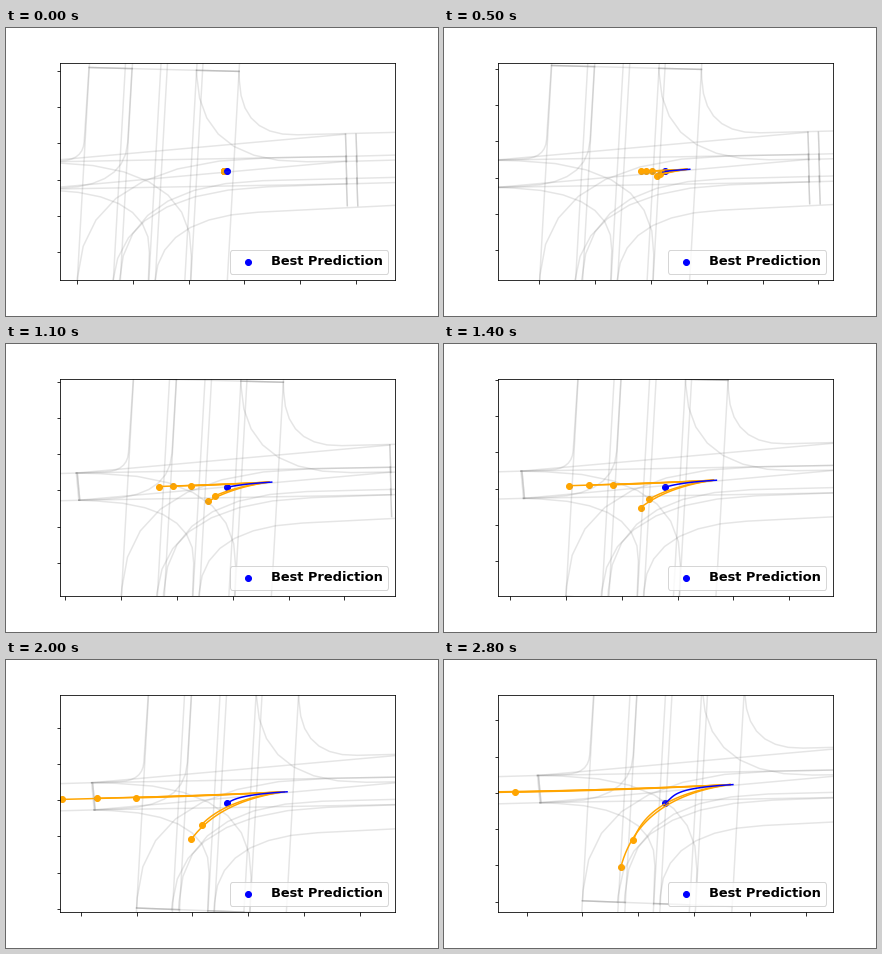
These frames come from a looping animation (432x288 px, 2900 ms). A matplotlib script:

```python
import numpy as np
import matplotlib.pyplot as plt
from matplotlib.animation import FuncAnimation

W, H, DPI = 432, 288, 72
FRAMES, INTERVAL = 29, 100
LEFT, RIGHT, TOP, BOTTOM = 54, 388.8, 34.56, 252
START = np.array([(LEFT + RIGHT) / 2, (TOP + BOTTOM) / 2])
MAP_SHIFT = np.array([0.5, -0.8])

fig = plt.figure(figsize=(W / DPI, H / DPI), dpi=DPI, facecolor="white")
ax = fig.add_axes([LEFT / W, 1 - BOTTOM / H, (RIGHT - LEFT) / W, (BOTTOM - TOP) / H])
ax.set_xticks(70.95 + (RIGHT - LEFT) / 6 * np.arange(-3, 8), labels=[])
ax.set_yticks(42.85 + (BOTTOM - TOP) / 6 * np.arange(-2, 9), labels=[])


def road(*points, times=1):
    xy = np.array(points) + MAP_SHIFT
    for _ in range(times):
        ax.plot(*xy.T, color="gray", alpha=0.2, lw=1.5)


def turn(start, corner, end, lead_in, lead_out):
    """Straight part of each leg, joined by a coarse arc round the corner."""
    start, corner, end = map(np.array, (start, corner, end))
    a = start + (corner - start) * lead_in
    b = end + (corner - end) * lead_out
    u = np.linspace(0, 1, 8)[:, None]
    arc = (1 - u) ** 2 * a + 2 * u * (1 - u) * corner + u ** 2 * b
    road(start, *arc, end)


# North-south lane borders, all leaning the same way
borders = [83, 119, 126, 154.5, 161, 190.5, 196.5, 233]


def on_border(i, y):
    return borders[i] - 0.056 * (y - 36), y


for i in range(len(borders)):
    road(on_border(i, 32), on_border(i, 276))


def stop_line(i, j, y, rise, times):
    road(*(on_border(k, y + rise * (borders[k] - borders[0])) for k in (i, j)), times=times)


for pairs, y, rise in [([(0, 2), (5, 7)], 40.3, 0.026), ([(0, 2), (3, 5)], 260.3, 0.038)]:
    stop_line(0, 7, y, rise, times=1)
    for i, j in pairs:
        stop_line(i, j, y, rise, times=2)

# Crossing lines on the west and east arms
west_top, west_low = (25.5, 135), (28, 162.2)
road(west_top, west_low)
road((26.5, 135), (29, 162.2), times=2)
for x in (339, 349.5):
    for k in range(3):
        road((x + 0.4 * k, 107 + 22 * k), (x + 0.4 * k + 1, 134.5 + 22 * k), times=2)

# East-west lane borders
for gate, straight, flat in [(west_top, 107, 129.2), (west_low, 134.2, 156.7)]:
    road((-20, gate[1] + 1.3), gate)
    road(gate, (339, straight))
    road(gate, (340, flat), (395, flat - 1.5))
road((340, 134.2), (395, 132.7))

# Turns through the crossing
turn((82.5, 40.3), (76.5, 133), west_top, 0.8, 0.55)
turn((125.5, 41), (118.7, 158.5), west_low, 0.63, 0.29)
turn((232.5, 44), (235, 109), (395, 105), 0.15, 0.65)
turn((190, 43), (193, 136), (340, 134), 0.05, 0.27)
turn(west_top, (188, 139), (183.7, 265), 0.15, 0.28)
turn(west_low, (145, 167), (141.5, 264), 0.15, 0.4)
turn((70.5, 260), (78, 134), (340, 129.2), 0.08, 0.3)
turn((105.5, 262), (114, 165), (340, 156.7), 0.07, 0.35)
turn((112.5, 262), (117, 157), (395, 150), 0.07, 0.5)
turn((147.8, 264), (152, 190), (395, 177.8), 0.12, 0.59)

t = np.arange(FRAMES)


def drive(vx, vy, ax_, ay_):
    """Constant acceleration from just behind the start."""
    return START + np.column_stack([-3 + t * (vx + ax_ * t), t * (vy + ay_ * t)])


# The slowing car passes these distances at even times
slowing = np.polyfit(np.linspace(0, 28, 5), [0, 32.1, 51, 60.7, 67.5], 4)
car = START + np.column_stack([-np.polyval(slowing, t), t * (0.34 + 0.0117 * t)])
agents = [
    drive(-8.55, 0.42, -0.128, -0.002),
    drive(-7.85, 0.42, -0.076, -0.005),
    drive(-6.7, 0.39, -0.0345, -0.0043),
    drive(-5.8, 0.75, 0.084, 0.0445),
    drive(-6.5, 0.95, 0.093, 0.0715),
]
paths = agents + [car]
colors = ["orange"] * len(agents) + ["blue"]
trails = [ax.plot([], [], color=c, lw=1.5)[0] for c in colors]
dots = [ax.scatter([], [], color=c) for c in colors]
dots[-1].set_label("Best Prediction")
ax.legend(loc="lower right", prop={"family": "DejaVu Sans", "size": 13, "weight": "bold"})


def draw(step):
    for path, trail, dot in zip(paths, trails, dots):
        trail.set_data(path[:step + 1].T)
        dot.set_offsets(path[step:step + 1])
    # The view stays centred on the car
    dx, dy = car[step] - START
    ax.set_xlim(LEFT + dx, RIGHT + dx)
    ax.set_ylim(BOTTOM + dy, TOP + dy)
    return trails + dots


anim = FuncAnimation(fig, draw, frames=FRAMES, interval=INTERVAL, repeat=True,
                     repeat_delay=0, init_func=lambda: draw(0))
plt.show()
```
